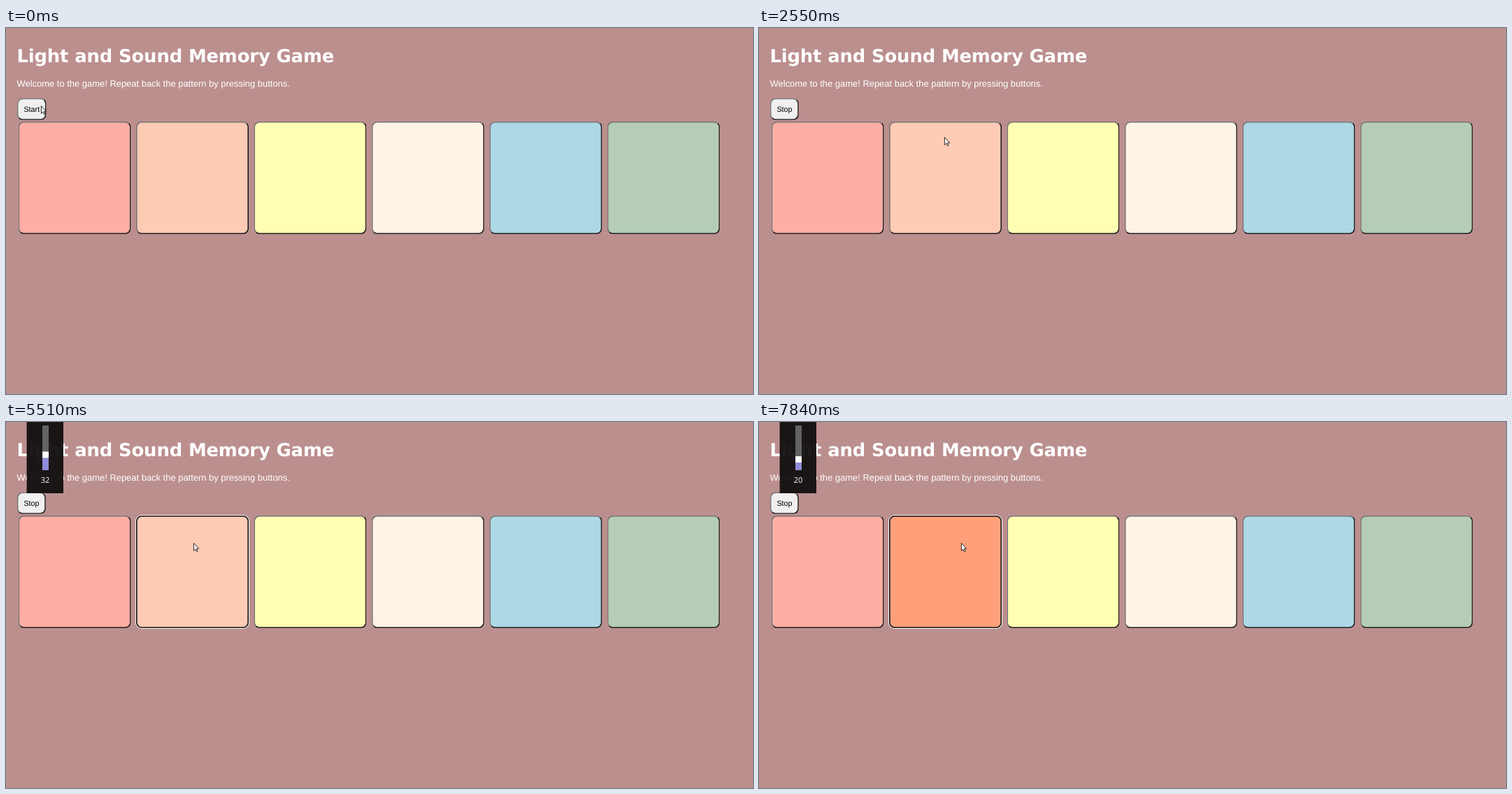
An HTML page for the animation above (7.99 s loop, 1068 by 524 pixels).

```html
<!DOCTYPE html>
<html lang="en">
<head>
<meta charset="utf-8">
<title>Light and Sound Memory Game</title>
<style>
  html, body { margin: 0; width: 1068px; height: 524px; overflow: hidden; background: #bc8f8f; }
  #page {
    position: absolute; left: 0; top: 0; transform-origin: 0 0;
    transform: translate(15.8px, 100.4px) scale(.805);
  }
  .box {
    --light: #767676; --dark: #1e1e1e;
    position: absolute; left: 0; top: 0; box-sizing: border-box;
    border: 2px solid; border-radius: 10px;
    border-color: var(--light) var(--dark) var(--dark) var(--light);
  }
  .box.pressed { border-color: var(--dark) var(--light) var(--light) var(--dark); }
  .box.focus { border-color: #101010; box-shadow: 0 0 0 1.25px #fff; }
  #button { height: 39px; background: #efefef; }
  .tile { width: 200px; height: 200px; }
  svg { position: absolute; left: 0; top: 0; }
  text { text-rendering: geometricPrecision; fill: #fff; }
  .title { font: bold 25.84px Verdana, "DejaVu Sans", sans-serif; letter-spacing: -.12px; }
  .intro { font: 12.94px Arial, "Liberation Sans", sans-serif; }
  #label { font: 10.77px Arial, "Liberation Sans", sans-serif; fill: #000; }
  #level { font: 11px "Open Sans", sans-serif; text-anchor: middle; }
</style>
</head>
<body>
<div id="page"><div id="button" class="box"></div></div>
<svg width="1068" height="524">
  <text class="title" x="15.4" y="49.4">Light and Sound Memory Game</text>
  <text class="intro" x="15.6" y="84">Welcome to the game! Repeat back the pattern by pressing buttons.</text>
  <text id="label" x="25.4" y="119.8"></text>
  <g id="volume">
    <rect x="29.6" width="52.4" height="102" fill="#110f0f" fill-opacity=".95"/>
    <rect x="52" y="5" width="9" height="64" fill="#636363"/>
    <rect id="fill" x="52" width="9" fill="#8e8cd8"/>
    <rect id="thumb" x="52" width="9" height="9" fill="#fff"/>
    <text id="level" x="56" y="87.3"></text>
  </g>
  <path id="cursor" d="M.4 .5V11.3L2.8 9 4.5 12.7 6 12 4.4 8.3H7.6Z" fill="#fff" stroke="#111" stroke-width=".9"/>
</svg>
<script>
const LOOP = 7990;
const STEP = 120;       // pointer sampling interval
const HOLD = 980;       // how long a clue stays lit
const COLORS = ['#ffaea5', '#ffcbb4', '#ffffb3', '#fdf4e6', '#add8e6', '#b5cdb6'];
const LIT = '#ffa07a';
const CLUES = [1220, 5630, 7000];
const PRESS = [4220, 4650];

// Pointer glides: start time, number of steps, end x, end y
const GLIDES = [
  [0, 1, 50, 111], [550, 1, 50, 108], [700, 3, 230, 35],
  [1620, 2, 222, 60], [1890, 2, 241, 118], [2190, 4, 265, 156],
  [3710, 3, 267, 172], [4930, 1, 268, 173], [5780, 2, 273, 171],
  [7420, 3, 279, 168], [7840, 1, 289, 173]
];

const $ = id => document.getElementById(id);
const during = (t, from, to) => t >= from && t < to;

const tiles = COLORS.map((color, i) => {
  const tile = document.createElement('div');
  tile.className = 'box tile';
  tile.style.transform = `translate(${2.24 + i * 209.2}px, 41.74px)`;
  tile.style.background = color;
  return $('page').appendChild(tile);
});

function pointerAt(t) {
  let x = 0, y = 0;
  for (const [start, steps, endX, endY] of GLIDES) {
    if (t < start) break;
    const p = Math.min(1, (Math.floor((t - start) / STEP) + 1) / steps);
    x += (endX - x) * p;
    y += (endY - y) * p;
  }
  return [x, y];
}

// The held volume key first jumps down, then repeats two points at a time.
function levelAt(t) {
  return t < 6080 ? 32 : Math.max(20, 28 - 2 * Math.floor((t - 6080) / 263));
}

function drawVolume(t) {
  $('volume').style.display = t < 5510 ? 'none' : '';
  const level = levelAt(t);
  const top = 5 + 55 * (1 - level / 100);
  $('thumb').setAttribute('y', top);
  $('fill').setAttribute('y', top + 9);
  $('fill').setAttribute('height', 60 - top);
  $('level').textContent = level;
}

function draw(t) {
  const started = t >= 270;
  $('label').textContent = started ? 'Stop' : 'Start';
  $('button').style.width = started ? '51px' : '52px';
  $('button').classList.toggle('pressed', during(t, 150, 270));

  const tile = tiles[1];
  const pressed = during(t, ...PRESS);
  const clue = CLUES.some(start => during(t, start, start + HOLD));
  tile.style.background = pressed || clue ? LIT : COLORS[1];
  tile.classList.toggle('pressed', pressed);
  tile.classList.toggle('focus', t >= 5360);

  drawVolume(t);
  $('cursor').setAttribute('transform', `translate(${pointerAt(t)})`);
}

const start = performance.now();
function tick() {
  draw((performance.now() - start) % LOOP);
  requestAnimationFrame(tick);
}
tick();
</script>
</body>
</html>
```
